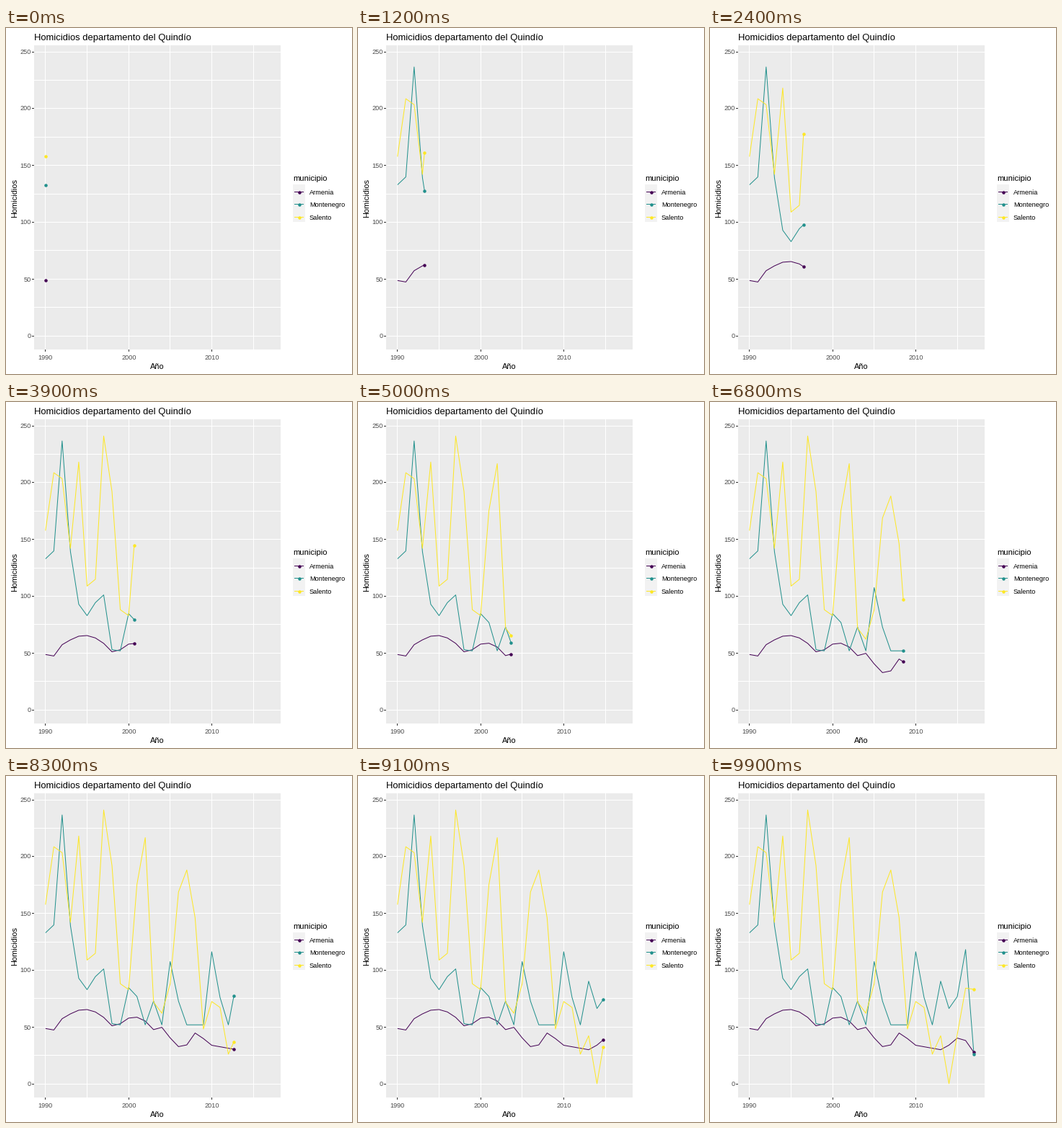
A matplotlib script for the animation above (10000 ms loop, 480 by 480 pixels).

```python
import numpy as np
import matplotlib.pyplot as plt
from matplotlib.animation import FuncAnimation
from matplotlib.patches import Rectangle

SIZE, DPI = 480, 80
PX = 72 / DPI  # one pixel in points
FRAMES, INTERVAL = 100, 100

YEARS = np.arange(1990, 2018)
T = YEARS - YEARS[0]
# each year is reached on a whole frame
KEYS = np.round(T * (FRAMES - 1) / T[-1])

LEFT, RIGHT, TOP, BOTTOM = 39, 381, 24, 446


def bump(center, height, width=1):
    """Rounded rise (or dip) on top of a trend."""
    return height * np.clip(1 - ((T - center) / width) ** 2, 0, None)


armenia = (60 - 1.3 * T + bump(0.5, -15) + bump(5.2, 12, 3)
           + bump(11, 13, 2.5) + bump(14, 8) + bump(16.3, -7)
           + bump(18.3, 9) + bump(25.4, 13.5, 1.8))

montenegro = (np.maximum(133 - 10 * T, 52) + bump(2.05, 124, 1.13)
              + bump(6.7, 42) + bump(10.4, 39) + bump(13, 21)
              + bump(15.2, 58) + bump(20.2, 67) + bump(23.2, 40)
              + bump(25.8, 69) + bump(27, -26))

salento = (135 - 5.2 * T + bump(1.5, 86, 1.75) + bump(4, 104)
           + bump(7.25, 148, 1.3) + bump(11.75, 150, 1.27)
           + bump(16.9, 142, 2.15) + bump(20.5, 46, 1.6)
           + bump(23, 27) + bump(24, -10) + bump(26.6, 92, 2.1))

SERIES = [("Armenia", "#440154", armenia),
          ("Montenegro", "#21908C", montenegro),
          ("Salento", "#FDE725", salento)]

plt.rcParams["font.family"] = "Liberation Sans"
fig = plt.figure(figsize=(SIZE / DPI, SIZE / DPI), dpi=DPI, facecolor="white")
ax = fig.add_axes([0, 0, 1, 1])
ax.set_xlim(-0.5, SIZE - 0.5)  # whole numbers are pixel centres
ax.set_ylim(SIZE - 0.5, -0.5)
ax.axis("off")


def px(year):
    return 54.3 + 11.53 * (year - YEARS[0])


def py(value):
    return 426.65 - 1.576 * value


def box(x0, y0, x1, y1, color):
    ax.add_patch(Rectangle((x0 - 0.5, y0 - 0.5), x1 - x0, y1 - y0,
                           facecolor=color, linewidth=0, zorder=0))


def line(xs, ys, color, z=1):
    return ax.plot(xs, ys, color=color, lw=PX, snap=False, zorder=z,
                   solid_capstyle="butt", solid_joinstyle="round")[0]


def dot(x, y, color):
    return ax.plot([x], [y], "o", ms=4.5 * PX, mec="none", mfc=color,
                   snap=False, zorder=4)[0]


def label(x, y, text, size, color="black", **kw):
    ax.text(x, y, text, fontsize=size * PX, color=color, **kw)


def draw_panel():
    box(LEFT, TOP, RIGHT, BOTTOM, "#EBEBEB")
    for v in range(0, 251, 25):
        y = round(py(v))
        line([LEFT - 0.5, RIGHT - 0.5], [y, y], "white")
        if v % 50 == 0:
            line([LEFT - 3.5, LEFT - 0.5], [y, y], "#333333")
            label(34.5, y + 3, str(v), 9.2, "#4D4D4D", ha="right")
    for year in range(1990, 2016, 5):
        x = round(px(year))
        line([x, x], [TOP - 0.5, BOTTOM - 0.5], "white")
        if year % 10 == 0:
            line([x, x], [BOTTOM - 0.5, BOTTOM + 2.5], "#333333")
            label(x, 459, str(year), 9.2, "#4D4D4D", ha="center")
    label(38.5, 16.5, "Homicidios departamento del Quindío", 13)
    label(209.7, 472.5, "Año", 11, ha="center")
    label(12, 235.5, "Homicidios", 11, rotation=90,
          ha="center", va="center")


def draw_legend():
    label(397.5, 211.5, "municipio", 11.2)
    box(398, 217, 415, 269, "#F2F2F2")
    for i, (name, color, _) in enumerate(SERIES):
        y = round(226.8 + 17.4 * i)
        line([399.5, 412.5], [y, y], color, 3)
        dot(406, y, color)
        label(420.5, y + 3.3, name, 9.15)


draw_panel()
draw_legend()
lines = [line([], [], color, 3) for _, color, _ in SERIES]
dots = [dot(-50, -50, color) for _, color, _ in SERIES]


def update(frame):
    past = KEYS <= frame
    xs = px(np.append(YEARS[past], np.interp(frame, KEYS, YEARS)))
    for path, head, (_, _, values) in zip(lines, dots, SERIES):
        now = np.interp(frame, KEYS, values)
        ys = py(np.append(values[past], now))
        path.set_data(xs, ys)
        head.set_data(xs[-1:], ys[-1:])
    return lines + dots


anim = FuncAnimation(fig, update, frames=FRAMES, interval=INTERVAL,
                     repeat=True, repeat_delay=0, blit=False)
plt.show()
```
